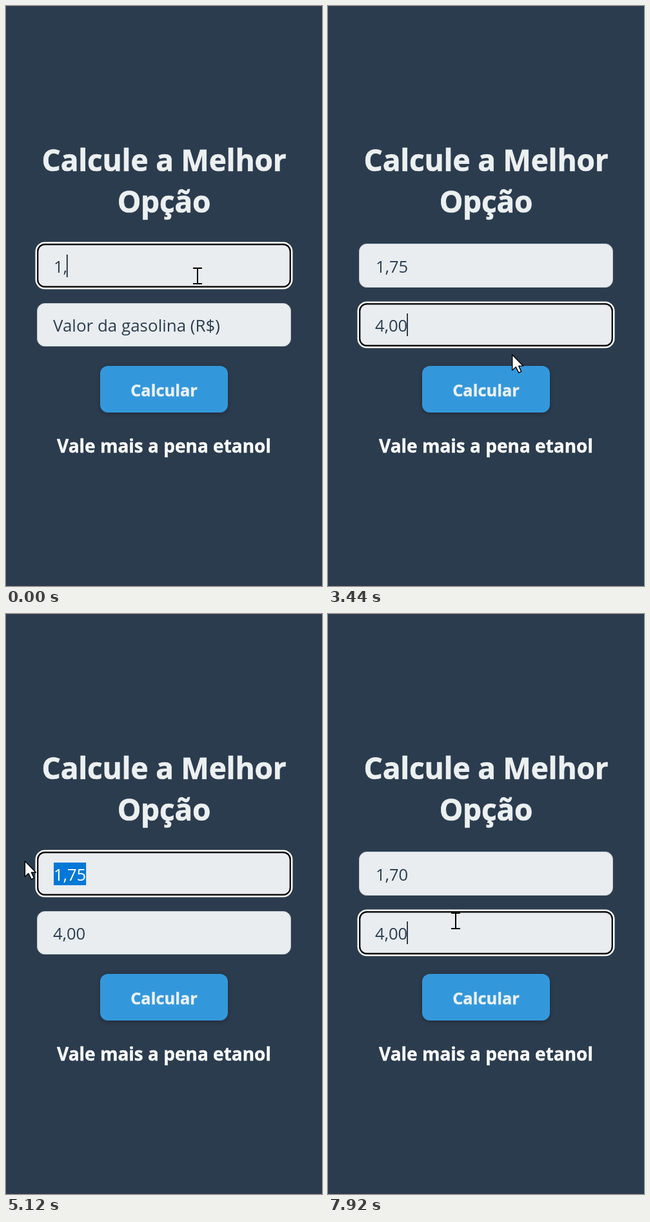
Animation of 490 by 896 pixels, one loop 8000 ms. Source, as an HTML page:

```html
<!DOCTYPE html>
<html lang="pt-BR">
<head>
<meta charset="utf-8">
<title>Calculadora</title>
<style>
  html, body { margin: 0; width: 100%; height: 100%; overflow: hidden; background: #2b3c4e; }
  svg { display: block; width: 490px; height: 896px; font-family: "Open Sans", "Noto Sans", sans-serif; }
  text { white-space: pre; }
  .bold { font-weight: 700; text-anchor: middle; fill: #ecf0f1; stroke: #ecf0f1; stroke-width: .4; }
  .title { font-size: 46px; letter-spacing: -.2px; stroke-width: .7; }
  .result { font-size: 28px; fill: #fff; stroke: #fff; }
  .value { font-size: 25.6px; fill: #2c3e50; }
  .hint { font-size: 25.95px; }
  .field { fill: #e9edf0; stroke: #c4cad0; }
  #button { filter: drop-shadow(0 2px 3px rgba(0, 0, 0, .25)); }
  #ring, #cursor path { fill: none; }
  #cursor .solid { fill: #fff; stroke: #000; stroke-width: 1.4; stroke-linejoin: round; }
</style>
</head>
<body>
<svg viewBox="0 0 490 896">
  <text class="bold title" x="245" y="255">Calcule a Melhor</text>
  <text class="bold title" x="245" y="319">Opção</text>

  <rect class="field" x="48.5" y="367.5" width="393" height="67" rx="11.5"/>
  <rect class="field" x="48.5" y="459.5" width="393" height="66" rx="11.5"/>
  <g id="ring">
    <rect x="46.8" width="396.4" rx="13.5" stroke="#fff" stroke-width="2.6"/>
    <rect x="49.2" width="391.6" rx="11" stroke="#101010" stroke-width="2.4"/>
  </g>
  <rect id="selection" y="384" height="35" fill="#0078d7"/>
  <text class="value" x="74" y="412"><tspan></tspan><tspan fill="#fff"></tspan></text>
  <text class="value" x="73" y="503"></text>
  <rect id="caret" width="1.7" height="35" fill="#15202b"/>

  <g id="button">
    <rect x="146" y="556" width="198" height="72" rx="12" fill="#3398db"/>
    <text class="bold" x="245" y="603" font-size="25.4">Calcular</text>
  </g>
  <text class="bold result" x="245" y="690">Vale mais a pena etanol</text>

  <g id="cursor">
    <path d="M-7-12H7M0-12V12M-7 12H7" stroke="#000" stroke-width="2"/>
    <g>
      <path class="solid" d="M-2.5 2.5Q-2.5 0 0 0T2.5 2.5V10Q5 8.5 7 11Q9.5 9.5 11 12.5Q14.5 11.5 14.5 15.5V22Q14.5 26 12 29V31H-.5V29L-8.5 18.5Q-10 16-8 15Q-6 14.5-2.5 18.5Z"/>
      <path d="M2.5 10V16M7 11V16M11 12.5V17" stroke="#000" stroke-width="1.2"/>
    </g>
    <path class="solid" d="M0 0V24L5.5 19L10 28L14 26L10 17.5H17Z"/>
  </g>
</svg>
<script>
  const LOOP = 8000, LEFT = 74, LEFT2 = 73;
  const $ = s => document.querySelector(s);
  const attr = (el, map) => { for (const k in map) el.setAttribute(k, map[k]); };
  const show = (el, on) => { el.style.display = on ? '' : 'none'; };
  const values = document.querySelectorAll('.value');
  const [plain, picked] = values[0].children;
  const [glow, line] = $('#ring').children;
  const cursors = [...$('#cursor').children];

  // Each track is a list of [start, value]
  const ethanol = [[0, '1,'], [240, '1,7'], [480, '1,75'], [5600, '1'], [6400, '1,'], [6600, '1,7'], [6800, '1,70']];
  const petrol = [[0, ''], [2000, '4'], [2720, '4,'], [2960, '4,0'], [3120, '4,00']];
  const focus = [[0, 0], [1500, 1], [3760, -1], [4240, 0], [7600, 1]];
  // Opacity of the button, linear between [time, value]
  const press = [[3740, 1], [3840, .65], [3900, .5], [4100, 1]];
  // Pointer moves: start, end, x, y
  const moves = [[0, 0, 297, 417], [1120, 1440, 279, 512], [3280, 3680, 298, 587],
    [4000, 4220, 263, 395], [4640, 5200, 16, 381], [7120, 7520, 198, 474]];

  const at = (track, t) => track.filter(e => e[0] <= t).pop();

  function pointer(t) {
    let [, , x, y] = moves[0];
    for (const [a, b, tx, ty] of moves.slice(1)) {
      if (t < a) break;
      const k = Math.min(1, (t - a) / (b - a)), e = k * k * (3 - 2 * k);
      x += (tx - x) * e;
      y += (ty - y) * e;
    }
    return [x, y];
  }

  function opacity(t) {
    for (let i = 1; i < press.length; i++) {
      const [a, from] = press[i - 1], [b, to] = press[i];
      if (t >= a && t < b) return from + (to - from) * (t - a) / (b - a);
    }
    return 1;
  }

  function draw(t) {
    const [x, y] = pointer(t);
    const [typed, first] = at(ethanol, t);
    const [typed2, second] = at(petrol, t);
    const [since, active] = at(focus, t);

    // Dragging left selects the text from its end
    plain.textContent = first;
    picked.textContent = '';
    const end = LEFT + values[0].getComputedTextLength();
    let cut = first.length;
    if (t > 4640 && t < 5600)
      while (cut > 0 && x < LEFT + (end - LEFT) * (cut - .5) / first.length) cut--;
    plain.textContent = first.slice(0, cut);
    const start = LEFT + values[0].getComputedTextLength();
    picked.textContent = first.slice(cut);
    attr($('#selection'), { x: start, width: end - start });

    values[1].textContent = second || 'Valor da gasolina (R$)';
    values[1].classList.toggle('hint', !second);
    const end2 = second ? LEFT2 + values[1].getComputedTextLength() : LEFT2;

    show($('#ring'), active >= 0);
    const top = active ? 459 : 367, height = active ? 67 : 68;
    attr(glow, { y: top - 1.2, height: height + 2.4 });
    attr(line, { y: top + 1.2, height: height - 2.4 });

    const idle = t - Math.max(since, typed, typed2);
    show($('#caret'), active >= 0 && cut === first.length && idle % 1000 < 500);
    attr($('#caret'), { x: (active ? end2 : end) - 1, y: active ? 475 : 384 });

    $('#button').style.opacity = opacity(t);

    const inside = (l, tp, r, b) => x > l && x < r && y > tp && y < b;
    const kind = inside(146, 556, 344, 628) ? 1
      : inside(48, 367, 442, 435) || inside(48, 459, 442, 526) ? 0 : 2;
    cursors.forEach((c, i) => show(c, i === kind));
    attr($('#cursor'), { transform: `translate(${x} ${y})` });
  }

  const begin = performance.now();
  function tick() {
    draw((performance.now() - begin) % LOOP);
    requestAnimationFrame(tick);
  }
  tick();
</script>
</body>
</html>
```
